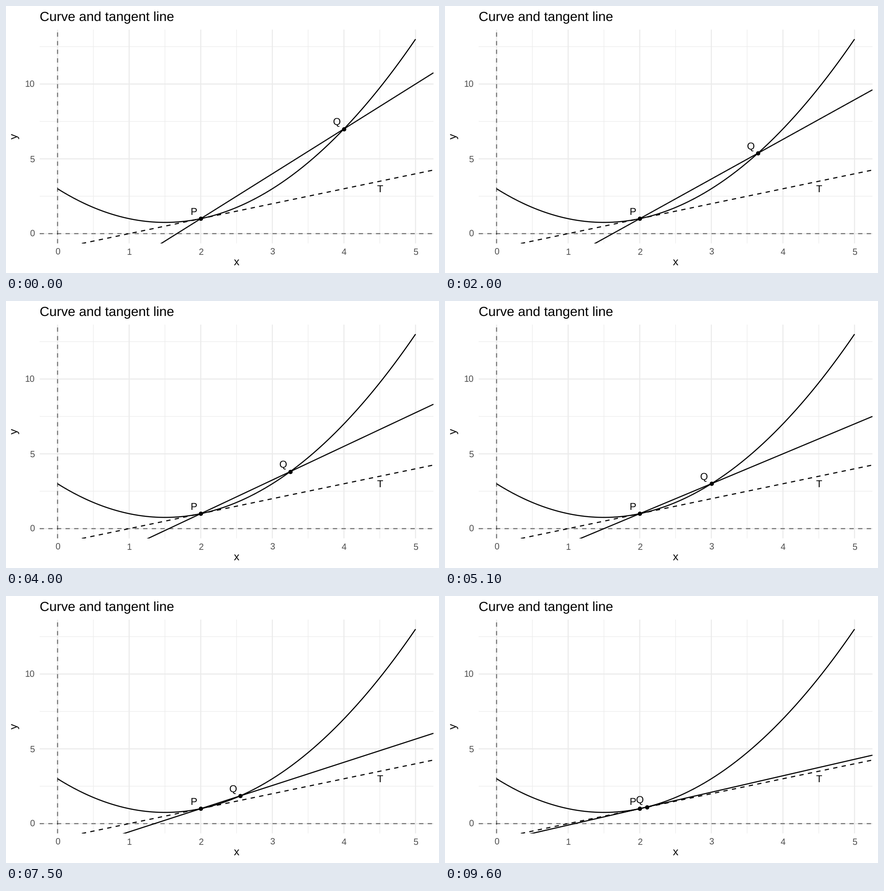
These frames come from a looping animation (952x588 px, 10000 ms). A matplotlib script:

```python
import matplotlib.pyplot as plt
import numpy as np
from matplotlib.animation import FuncAnimation

W, H, DPI = 952, 588, 64
PT = 72 / DPI                       # points per pixel
LEFT, RIGHT, TOP, BOTTOM = 74.0, 939.8, 51.6, 522.7
XLIM, YLIM = (-0.25, 5.25), (-0.65, 13.65)
LINE = 2.37
DASH = (0, (4, 4))
GREY = "#4d4d4d"

plt.rcParams.update({
    "font.family": "Liberation Sans",
    "text.hinting": "none",
    "path.snap": False,
    "lines.solid_capstyle": "butt",
    "lines.dash_capstyle": "butt",
})


def curve(x):
    return x ** 2 - 3 * x + 3


def to_px(x, y):
    """Data coordinates to stage pixels, y pointing down."""
    u = (x - XLIM[0]) / (XLIM[1] - XLIM[0])
    v = (y - YLIM[0]) / (YLIM[1] - YLIM[0])
    return LEFT + u * (RIGHT - LEFT), BOTTOM - v * (BOTTOM - TOP)


def label(x, y, text, size, ha="center", color="black", **kw):
    """Text with its baseline at the pixel (x, y)."""
    return fig.text(x / W, 1 - y / H, text, fontsize=size * PT, ha=ha,
                    va="baseline", color=color, rotation_mode="anchor", **kw)


def stroke(x, y, width=LINE, color="black", **kw):
    return ax.plot(x, y, color=color, lw=width * PT, **kw)[0]


def dot(x):
    return ax.plot([x], [curve(x)], "o", color="black", ms=9.4 * PT, mew=0)[0]


def name(x, y, text):
    """Point name centred on data coordinates."""
    px, py = to_px(x, y)
    return label(px, py + 7.9, text, 22)


fig = plt.figure(figsize=(W / DPI, H / DPI), dpi=DPI, facecolor="white")
ax = fig.add_axes([LEFT / W, 1 - BOTTOM / H,
                   (RIGHT - LEFT) / W, (BOTTOM - TOP) / H])
ax.set_xlim(*XLIM)
ax.set_ylim(*YLIM)
ax.axis("off")

# Grid: minor lines first, then major
for xs, ys, width in ((np.arange(0.5, 5), (2.5, 7.5, 12.5), LINE / 2),
                      (range(6), (0, 5, 10), LINE)):
    for y in ys:
        stroke(XLIM, (y, y), width, "#ebebeb")
    for x in xs:
        stroke((x, x), YLIM, width, "#ebebeb")

# Text around the panel
label(LEFT, 33.3, "Curve and tangent line", 29.33, ha="left")
for x in range(6):
    label(to_px(x, 0)[0], 547.6, str(x), 19.55, color=GREY)
for y in (0, 5, 10):
    label(63.2, to_px(0, y)[1] + 6.9, str(y), 19.55, ha="right", color=GREY)
label((LEFT + RIGHT) / 2, 570.6, "x", 24.44)
label(25, (TOP + BOTTOM) / 2, "y", 24.44, rotation=90)

# Fixed lines
ends = np.array(XLIM)
stroke(XLIM, (0, 0), color=(0, 0, 0, 0.5), linestyle=DASH)
stroke((0, 0), YLIM, color=(0, 0, 0, 0.5), linestyle=DASH)
t = np.linspace(0, 5, 201)
stroke(t, curve(t))
stroke(ends, ends - 1, linestyle=DASH)
dot(2)
name(1.9, 1.5, "P")
name(4.5, 3, "T")

# Moving parts
secant = stroke(ends, ends)
q_dot = dot(4)
q_name = name(3.9, 7.5, "Q")

# Q rests, then slides 0.1 to the left; the first two slides are slower
times, places = [2, 5, 8, 11], [4, 3.9, 3.9, 3.8]
for k in range(3, 20):
    times += [5 * k - 1, 5 * k + 1]
    places += [4.1 - 0.1 * k, 4 - 0.1 * k]


def update(frame):
    q = np.interp(frame, times, places)
    y = curve(q)
    secant.set_ydata(1 + (q - 1) * (ends - 2))
    q_dot.set_data([q], [y])
    px, py = to_px(q - 0.1, y + 0.5)
    q_name.set_position((px / W, 1 - (py + 7.9) / H))
    return secant, q_dot, q_name


anim = FuncAnimation(fig, update, frames=100, interval=100,
                     repeat=True, repeat_delay=0)
plt.show()
```
